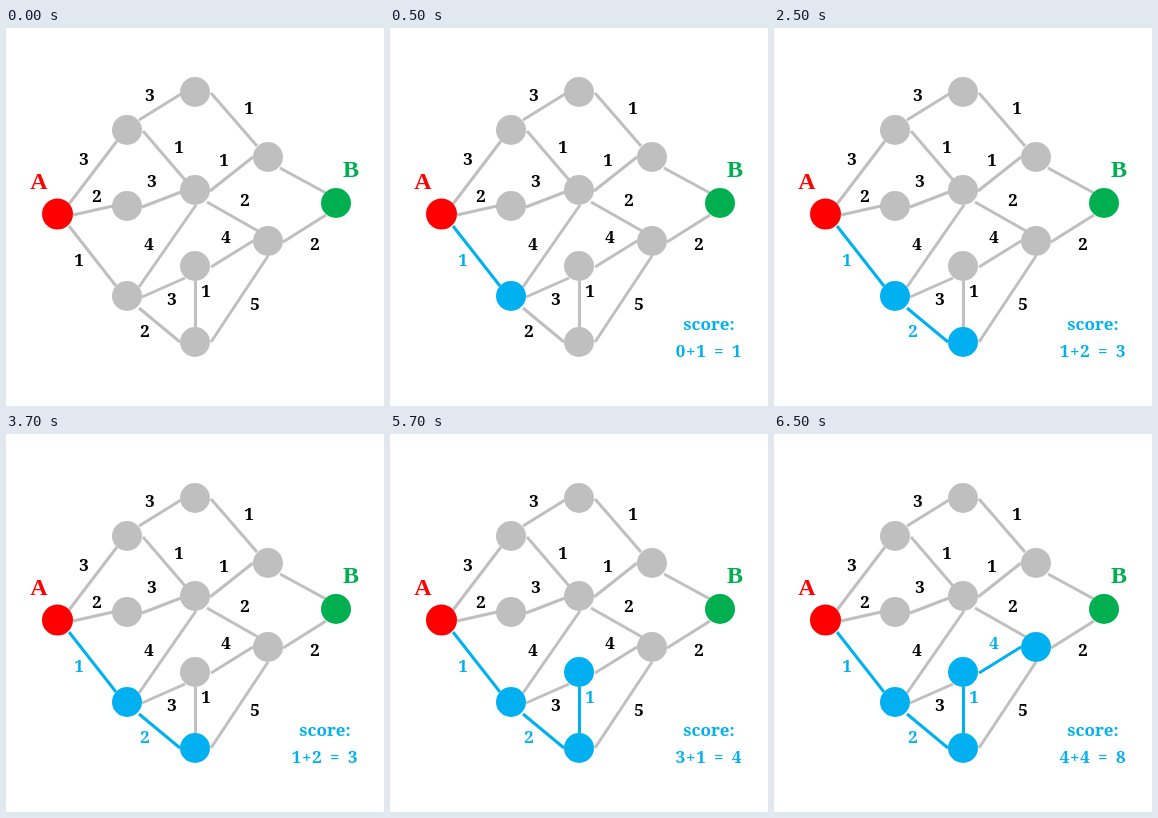
Write an HTML page that moves like this. It is 378x378 px and loops after 8000 ms.

```html
<!DOCTYPE html>
<html lang="en">
<head>
<meta charset="utf-8">
<title>Greedy path search</title>
<style>
  html, body { margin: 0; width: 100%; height: 100%; overflow: hidden; background: #fff; }
  svg { display: block; width: 100vw; height: 100vh; }
  line { stroke: currentColor; stroke-width: 3; color: #bfbfbf; }
  circle { fill: currentColor; color: #bfbfbf; }
  text {
    fill: currentColor; color: #000; text-anchor: middle;
    font: bold 17px "Noto Serif", serif;
  }
  .end { font: bold 24px "Liberation Serif", "Times New Roman", serif; }
  .a { color: #f00; }
  .b { color: #00b050; }
  .score { color: #00b0f0; visibility: hidden; }
  .sum { word-spacing: 2.5px; letter-spacing: .7px; }

  /* Each step turns its edge, node and label blue. */
  .s1, .s2, .s3, .s4, .score { animation: 8s step-end infinite; }
  .s1 { animation-name: step1; }
  .s2 { animation-name: step2; }
  .s3 { animation-name: step3; }
  .s4 { animation-name: step4; }
  @keyframes step1 { 6.25%, to { color: #00b0f0; } }
  @keyframes step2 { 31.25%, to { color: #00b0f0; } }
  @keyframes step3 { 56.25%, to { color: #00b0f0; } }
  @keyframes step4 { 81.25%, to { color: #00b0f0; } }

  .head { animation-name: head; }
  .sum1 { animation-name: sum1; }
  .sum2 { animation-name: sum2; }
  .sum3 { animation-name: sum3; }
  .sum4 { animation-name: sum4; }
  @keyframes head { 6.25%, to { visibility: visible; } }
  @keyframes sum1 { 6.25% { visibility: visible; } 31.25%, to { visibility: hidden; } }
  @keyframes sum2 { 31.25% { visibility: visible; } 56.25%, to { visibility: hidden; } }
  @keyframes sum3 { 56.25% { visibility: visible; } 81.25%, to { visibility: hidden; } }
  @keyframes sum4 { 81.25%, to { visibility: visible; } }
</style>
</head>
<body>
<svg viewBox="0 0 378 378">
  <g id="edges">
    <line x1="63" y1="176" x2="111" y2="113"/>
    <line x1="67" y1="187" x2="107" y2="178"/>
    <line x1="133" y1="92" x2="175" y2="66"/>
    <line x1="137" y1="103" x2="180" y2="153"/>
    <line x1="136" y1="179" x2="175" y2="164"/>
    <line x1="133" y1="259" x2="190" y2="177"/>
    <line x1="136" y1="269" x2="179" y2="250"/>
    <line x1="205" y1="65" x2="251" y2="118"/>
    <line x1="204" y1="163" x2="247" y2="129"/>
    <line x1="201" y1="174" x2="252" y2="203"/>
    <line x1="205" y1="314" x2="262" y2="228"/>
    <line x1="274" y1="140" x2="320" y2="165"/>
    <line x1="277" y1="214" x2="320" y2="187"/>
    <line class="s1" x1="63" y1="198" x2="110" y2="258"/>
    <line class="s2" x1="133" y1="280" x2="174" y2="314"/>
    <line class="s3" x1="189.5" y1="253" x2="189.5" y2="299"/>
    <line class="s4" x1="205" y1="239" x2="247" y2="213"/>
  </g>
  <g id="nodes">
    <circle cx="121" cy="102" r="15"/>
    <circle cx="189" cy="64" r="15"/>
    <circle cx="121" cy="178" r="15"/>
    <circle cx="189" cy="162" r="15"/>
    <circle cx="262" cy="129" r="15"/>
    <circle class="s1" cx="121" cy="268" r="15"/>
    <circle class="s2" cx="189" cy="314" r="15"/>
    <circle class="s3" cx="189" cy="238" r="15"/>
    <circle class="s4" cx="262" cy="213" r="15"/>
    <circle class="a" cx="51.5" cy="186" r="15.5"/>
    <circle class="b" cx="330" cy="175" r="15"/>
  </g>
  <g id="weights">
    <text x="78" y="137">3</text>
    <text x="144" y="73">3</text>
    <text x="243" y="86">1</text>
    <text x="173" y="125">1</text>
    <text x="146" y="159">3</text>
    <text x="218" y="138">1</text>
    <text x="91" y="174">2</text>
    <text x="239" y="178">2</text>
    <text x="143" y="222">4</text>
    <text x="309" y="222">2</text>
    <text x="166" y="277">3</text>
    <text x="249" y="282">5</text>
    <text class="s1" x="73" y="238">1</text>
    <text class="s2" x="139" y="309">2</text>
    <text class="s3" x="200" y="269">1</text>
    <text class="s4" x="220" y="215">4</text>
  </g>
  <text class="end a" x="33" y="161">A</text>
  <text class="end b" x="345" y="149">B</text>
  <text class="score head" x="319" y="302">score:</text>
  <text class="score sum sum1" x="319" y="329">0+1 = 1</text>
  <text class="score sum sum2" x="319" y="329">1+2 = 3</text>
  <text class="score sum sum3" x="319" y="329">3+1 = 4</text>
  <text class="score sum sum4" x="319" y="329">4+4 = 8</text>
</svg>
</body>
</html>
```
